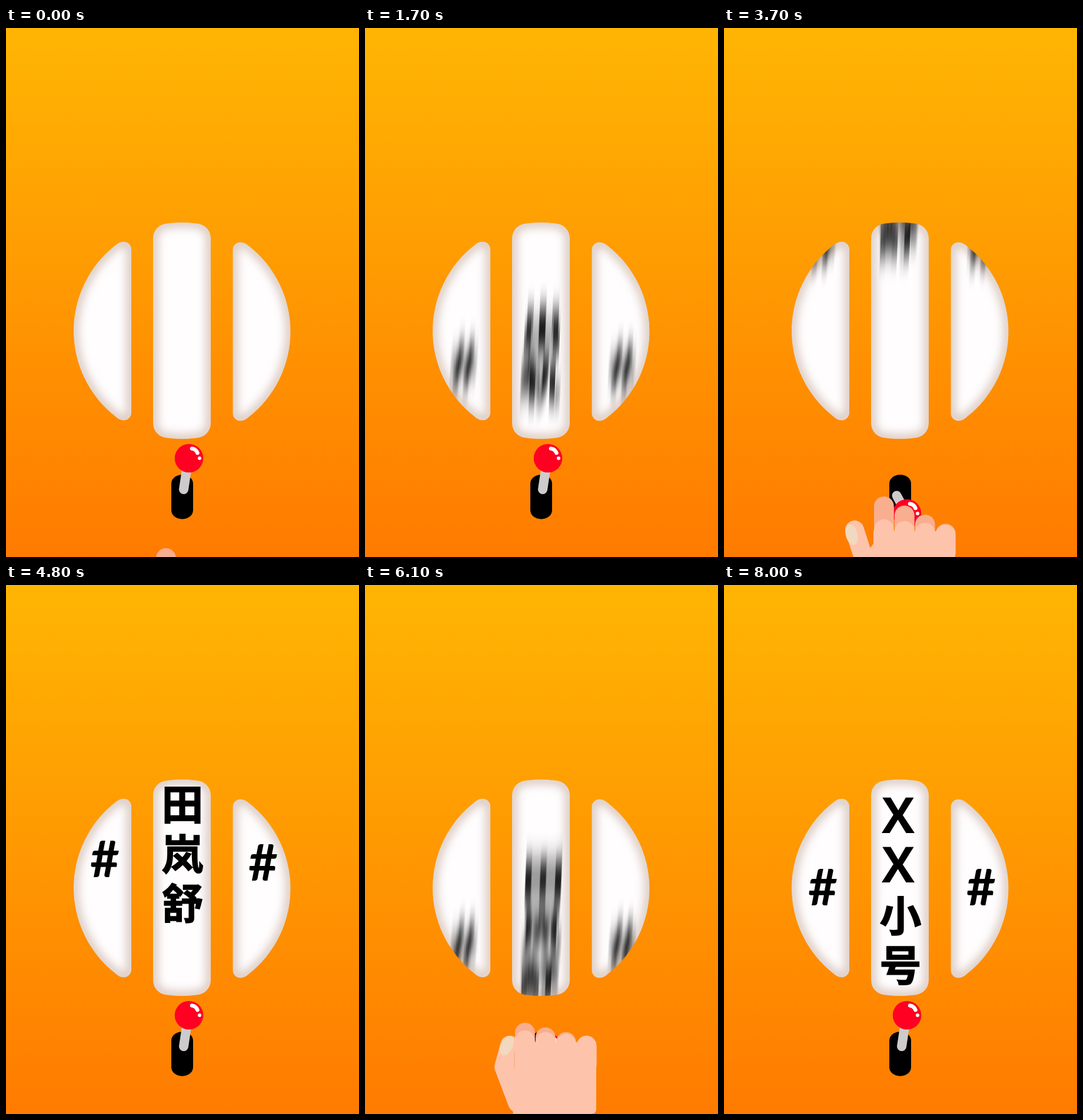
Write an HTML page that moves like this. It is 600x900 px and loops after 8100 ms.

```html
<!DOCTYPE html>
<html lang="zh">
<head>
<meta charset="utf-8">
<title>Slot machine</title>
<style>
  html, body { margin: 0; width: 100%; height: 100%; overflow: hidden; background: #ff9800; }
  svg { display: block; width: 600px; height: 900px; }
  text { text-anchor: middle; fill: #000; }
  .cjk { font: 900 71px "Noto Sans CJK SC", "Noto Sans CJK", sans-serif; stroke: #000; stroke-width: 1.5px; }
  .latin { font: 700 84px "Noto Sans", "Open Sans", sans-serif; }
  .hash { font: 700 86px Lato, "Open Sans", sans-serif; }
</style>
</head>
<body>
<svg viewBox="0 0 600 900">
  <defs>
    <linearGradient id="sky" x1="0" y1="0" x2="0" y2="1">
      <stop offset="0" stop-color="#ffb503"/>
      <stop offset="1" stop-color="#ff7b00"/>
    </linearGradient>
    <path id="left" d="M213 377A13 13 0 0 0 200 363.5Q193 363.5 186 369.5A185 185 0 0 0 186 661Q193 667.5 200 667.5A13 13 0 0 0 213 654Z"/>
    <path id="mid" d="M250 357A25 25 0 0 1 274 332.5Q299 329 324 332.5A25 25 0 0 1 348 357V673A25 25 0 0 1 324 697.5Q299 701 274 697.5A25 25 0 0 1 250 673Z"/>
    <use id="right" href="#left" transform="translate(598.5 1) scale(-1 1)"/>
    <clipPath id="clip-left"><use href="#left"/></clipPath>
    <clipPath id="clip-mid"><use href="#mid"/></clipPath>
    <clipPath id="clip-right"><use href="#left" transform="translate(598.5 1) scale(-1 1)"/></clipPath>
    <filter id="soft" filterUnits="userSpaceOnUse" x="60" y="290" width="480" height="450"><feGaussianBlur stdDeviation="8"/></filter>
    <filter id="streak" filterUnits="userSpaceOnUse" x="100" y="240" width="400" height="560"><feGaussianBlur id="streakBlur" stdDeviation="0 0"/></filter>
  </defs>

  <rect width="600" height="900" fill="url(#sky)"/>
  <g id="slots"></g>

  <rect x="281" y="760" width="37" height="75.5" rx="18" ry="15"/>
  <line id="rod" stroke="#cdcbcc" stroke-width="16" stroke-linecap="round"/>
  <g id="knob">
    <circle r="24.3" fill="#ff0022"/>
    <path d="M5 -16.5Q12 -15.5 14.5 -9" fill="none" stroke="#fff" stroke-width="6.5" stroke-linecap="round"/>
    <circle cx="18" r="3" fill="#fff"/>
  </g>

  <g id="hand" fill="#fdc4ab">
    <g id="fingers" fill="#f9ae90"></g>
    <path id="thumb" fill="none" stroke="#fdc4ab" stroke-width="32" stroke-linecap="round" stroke-linejoin="round"/>
    <ellipse id="nail" rx="10" ry="18" fill="#f2d8bf"/>
    <g id="knuckles"></g>
    <path d="M254 20H393V134Q393 142 385 142H252L238 64L254 41Z"/>
    <path id="crease" d="M254 37V65" stroke="#f9ae90" stroke-width="1.5"/>
  </g>
</svg>
<script>
const LOOP = 8100, SPIN = 2700, STEP = 100;
const WORDS = ['', '出轨', '田岚舒', 'XX小号'];
const $ = id => document.getElementById(id);
const set = (el, attrs) => { for (const k in attrs) el.setAttribute(k, attrs[k]); };
const mix = (a, b, k) => a + (b - a) * k;
const span = (t, a, b) => Math.min(1, Math.max(0, (t - a) / (b - a)));
const smooth = (t, a, b) => { const u = span(t, a, b); return u * u * (3 - 2 * u); };

function column(word) {
  return [...word].map((c, i) => {
    const y = 519.5 + (i - (word.length - 1) / 2) * 84.6, latin = c === 'X';
    return `<text class="${latin ? 'latin' : 'cjk'}" x="${latin ? 296 : 300}" y="${y + (latin ? 29 : 27)}">${c}</text>`;
  }).join('');
}
const hash = x => word => word && `<text class="hash" x="${x}" y="545">#</text>`;

// Each reel makes three turns of the given size, at speed px per ms.
const TURNS = 3, RAMP = 480;
const reels = [
  { id: 'left', start: 400, speed: 1.06, size: 532, draw: hash(168) },
  { id: 'mid', start: 480, speed: 1.3, size: 619, draw: column },
  { id: 'right', start: 400, speed: 1.06, size: 530, draw: hash(437) }
];
$('slots').innerHTML = reels.map(({ id, draw }) => `<g clip-path="url(#clip-${id})">
  <use href="#${id}" fill="#fffdfe"/>
  <use href="#${id}" fill="none" stroke="#c9b1a2" stroke-opacity=".75" stroke-width="15" filter="url(#soft)"/>
  <g id="reel-${id}">${WORDS.map(w => `<g>${draw(w)}</g>`).join('')}</g></g>`).join('');

function travel({ start, speed, size }, p) {
  const t = Math.max(0, p - start);
  const d = t < RAMP ? t * t / (2 * RAMP) : t - RAMP / 2;
  return Math.min(speed * d, TURNS * size);
}

function drawReels(p, spin) {
  const b = 22 * Math.min(span(p, 400, 600), 1 - span(p, 1900, 2100));
  set($('streakBlur'), { stdDeviation: `0 ${b}` });
  for (const r of reels) {
    const d = travel(r, p), half = r.size / 2, el = $('reel-' + r.id);
    const shown = d < half ? spin : spin + 1;
    const y = (d + half) % r.size - half;
    set(el, {
      transform: `translate(${b * .9} ${y}) skewX(${-b / 10})`,
      filter: b ? 'url(#streak)' : 'none'
    });
    [...el.children].forEach((g, i) => set(g, { display: i === shown ? 'inline' : 'none' }));
  }
}

const bar = (i, y) => `<rect x="${255 + i * 34.9}" y="${y}" width="33.8" height="65" rx="16.9"/>`;
const four = [0, 1, 2, 3];
$('fingers').innerHTML = four.map(i => bar(i, 0)).join('');
$('knuckles').innerHTML = four.map(i => bar(i, 3 * i)).join('');

function drawLever(p) {
  const k = smooth(p, 500, 860) - smooth(p, 1000, 1400), y = mix(732, 826, k);
  set($('rod'), { x1: mix(302, 293.5, k), y1: mix(785, 795.5, k), x2: 310, y2: y });
  set($('knob'), { transform: `translate(311 ${y})` });
}

function drawHand(p) {
  const grip = smooth(p, 300, 500) - smooth(p, 800, 1000);
  const reach = 221 * (1 - span(p, 0, 650)) ** 2;
  const leave = 350 * ((Math.max(p, 800) - 800) / 600) ** 2;
  set($('hand'), { transform: `translate(0 ${703 + reach + 94 * smooth(p, 500, 860) + leave})` });
  [...$('fingers').children].forEach((el, i) => set(el, { y: mix(15.5 * i - 39, 8 * i - 13, grip) }));
  const x = mix(222, 246, grip), y = mix(18, 25, grip);
  set($('thumb'), { d: `M${x} ${y}L236 62L259 123` });
  set($('nail'), { transform: `translate(${x - 5} 26) rotate(${mix(-14, 26, grip)})` });
  set($('crease'), { opacity: grip });
}

const start = performance.now();
function frame() {
  const t = Math.floor((performance.now() - start) % LOOP / STEP) * STEP;
  const p = t % SPIN;
  drawReels(p, Math.floor(t / SPIN));
  drawLever(p);
  drawHand(p);
  requestAnimationFrame(frame);
}
frame();
</script>
</body>
</html>
```
